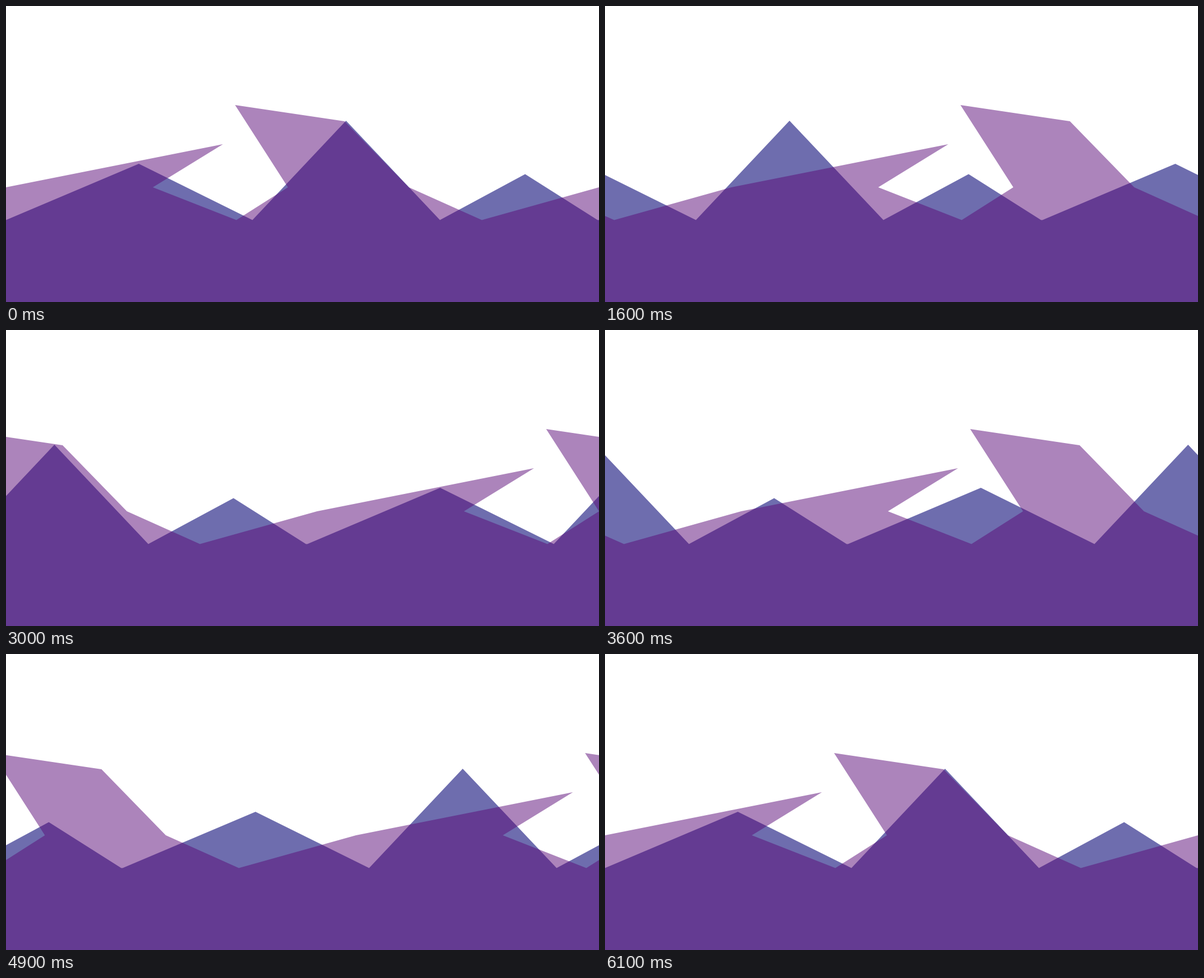
Write an HTML page with a canvas that moves like this. It is 1058 px wide and 529 px high and loops after 6.2 s.

```html
<!DOCTYPE html>
<html lang="en">
<head>
<meta charset="utf-8">
<title>Drifting ridges</title>
<style>
  html, body { margin: 0; width: 100%; height: 100%; overflow: hidden; background: #fff; }
  canvas { display: block; width: 1058px; height: 529px; }
</style>
</head>
<body>
<canvas id="stage" width="1058" height="529"></canvas>
<script>
const W = 1058, H = 529;
const LOOP = 6200, STEP = 100, LAST = LOOP / STEP - 1;
const BASE = 382.6, SHOULDER = 324;
const ctx = document.getElementById('stage').getContext('2d');

const point = (x, y) => ({ x, y });
const valley = x => point(x, BASE);
const shoulder = x => point(x, SHOULDER);

// A mountain climbs over one run and falls back to the base over the next.
function chain(mountains) {
  let x = 0;
  const outline = [valley(x)];
  for (const { rise, fall, height } of mountains) {
    outline.push(point(x + rise, BASE - height), valley(x + rise + fall));
    x += rise + fall;
  }
  return [...outline, valley(W)];
}

const peaks = chain([
  { rise: 237, fall: 202.7, height: 100.6 },
  { rise: 167, fall: 167.5, height: 177.6 },
  { rise: 152, fall: 129.3, height: 82 }
]);

const crags = [
  shoulder(0), point(387, 247), shoulder(262), valley(411),
  shoulder(503), point(408.7, 177), point(604, 206), shoulder(718.7),
  valley(849), shoulder(W)
];

// laps counts the stage widths travelled per loop.
const ridges = [
  { color: 'rgb(110,109,174)', laps: 1, outline: peaks },
  { color: 'rgba(91,10,120,0.5)', laps: 3, outline: crags }
];

function drawRidge({ color, laps, outline }, progress) {
  const left = -((progress * laps) % 1) * W;
  ctx.beginPath();
  ctx.moveTo(left, H);
  for (const offset of [left, left + W]) {
    for (const { x, y } of outline) ctx.lineTo(x + offset, y);
  }
  ctx.lineTo(left + 2 * W, H);
  ctx.closePath();
  ctx.fillStyle = color;
  ctx.fill();
}

function render(time) {
  const step = Math.floor((time % LOOP) / STEP);
  ctx.fillStyle = '#fff';
  ctx.fillRect(0, 0, W, H);
  for (const ridge of ridges) drawRidge(ridge, step / LAST);
}

const start = performance.now();
function tick(now) {
  render(Math.max(0, now - start));
  requestAnimationFrame(tick);
}
render(0);
requestAnimationFrame(tick);
</script>
</body>
</html>
```
